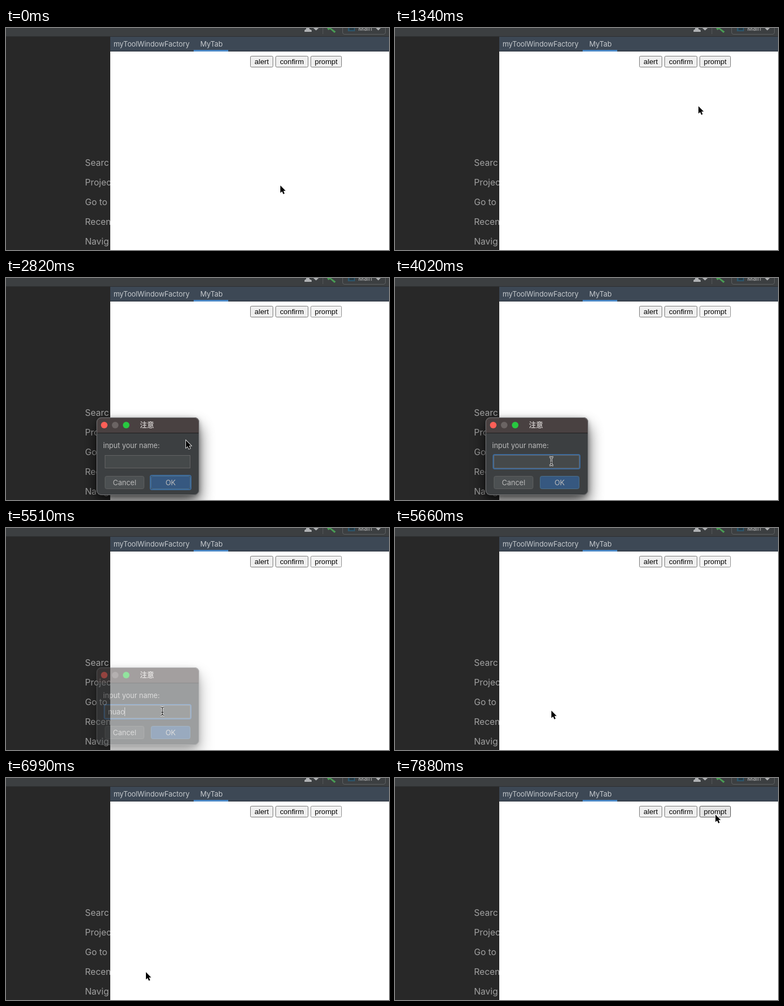
These frames come from a looping animation (698 px wide and 406 px high, 8000 ms). An HTML page:

```html
<!DOCTYPE html>
<html lang="en">
<head>
<meta charset="utf-8">
<title>Prompt dialog demo</title>
<style>
html, body { margin: 0; width: 100%; height: 100%; overflow: hidden; background: #fff; }
svg { display: block; width: 698px; height: 406px; }
text { font: 13px Inter, "Noto Sans CJK SC", "Noto Sans CJK", sans-serif; fill: #bbb; white-space: pre; }
.menu text { font-size: 16px; fill: #a0a0a0; }
.tab { letter-spacing: -.1px; fill: #c4c8cc; }
.web text { font: 13.333px "Liberation Sans", Arial, sans-serif; fill: #000; }
.mid { text-anchor: middle; }
.title { font-weight: 700; fill: #c5c0bf; }
</style>
</head>
<body>
<svg viewBox="0 0 698 406">
  <defs>
    <filter id="blur" x="-50%" y="-50%" width="200%" height="200%"><feGaussianBlur stdDeviation="14"/></filter>
    <filter id="soft" x="-20%" y="-20%" width="140%" height="140%"><feGaussianBlur stdDeviation="4"/></filter>
    <clipPath id="left"><rect width="190" height="406"/></clipPath>
  </defs>
  <rect width="698" height="406" fill="#fff"/>
  <rect width="190" height="406" fill="#282828"/>
  <g id="menu" class="menu" clip-path="url(#left)"></g>

  <rect width="698" height="15" fill="#3c3f41"/>
  <rect y="15" width="698" height="1" fill="#2d2f31"/>
  <g fill="#afb1b3">
    <path d="M547 0h6v2l4 2v3h-13v-3l3-2z"/>
    <path d="M560 0h10l-5 4.500z"/>
    <path d="M674 0h9l-4.500 4.500z"/>
  </g>
  <path d="M577.500 0V11" stroke="#555759"/>
  <path d="M585 0h7l9 6.500-2.500 2.500-8-7-3 2z" fill="#499c54"/>
  <path d="M613.500 0V8q0 3.500 3.500 3.500H688q3.500 0 3.500-3.500V0" fill="none" stroke="#5e6163"/>
  <path d="M623 0h13v6h-13z" fill="#2c566c"/>
  <path d="M626 0h8v4h-8z" fill="#263a44"/>
  <text x="642" y="5" style="font-size:11px">Main</text>

  <rect x="190" y="16" width="508" height="27" fill="#3d4855"/>
  <rect x="190" y="42" width="508" height="1" fill="#2c333c"/>
  <rect x="342" y="40" width="63" height="3" fill="#4a88c7"/>
  <text class="tab" x="196" y="34">myToolWindowFactory</text>
  <text class="tab" x="354" y="34">MyTab</text>

  <g id="web" class="web"></g>
  <g id="ask"></g>
  <g id="reply"></g>
  <path id="arrow" d="M0 0V13.500L3.100 10.700 5.300 15.700 7.700 14.700 5.500 9.800H9.600Z"
    stroke="#fff" stroke-width="1.600" paint-order="stroke"/>
  <g id="beam" fill="none">
    <path id="bar" d="M-3.500-7.500Q0-7.500 0-5V5Q0 7.500-3.500 7.500M3.500-7.500Q0-7.500 0-5V5Q0 7.500 3.500 7.500M-2 2H2" stroke="#fff" stroke-width="3"/>
    <use href="#bar" style="display:none"/>
    <path d="M-3.500-7.500Q0-7.500 0-5V5Q0 7.500-3.500 7.500M3.500-7.500Q0-7.500 0-5V5Q0 7.500 3.500 7.500M-2 2H2" stroke="#000" stroke-width="1.100"/>
  </g>
</svg>
<script>
const LOOP = 8000;
const NAME = 'nuao';
const $ = id => document.getElementById(id);
const show = (id, on) => $(id).setAttribute('visibility', on ? 'visible' : 'hidden');
const place = (id, [x, y]) => $(id).setAttribute('transform', `translate(${x} ${y})`);

// Rectangle whose 1px border lies inside the given box
const box = (x, y, w, h, r, fill, stroke, id = '') =>
  `<rect id="${id}" x="${x + .5}" y="${y + .5}" width="${w - 1}" height="${h - 1}" rx="${r}" fill="${fill}" stroke="${stroke}"/>`;

const ring = (x, y, w, h, id) =>
  `<rect id="${id}" x="${x + 1}" y="${y + 1}" width="${w - 2}" height="${h - 2}" rx="3" fill="none" stroke="#3d6a9a" stroke-width="2"/>`;

const label = (x, y, text, cls = '') => `<text class="${cls}" x="${x}" y="${y}">${text}</text>`;

function dialog(x, y, w, h, titleX, content) {
  const lights = ['#ff5f57', '#6b6463', '#28c840'].map((c, i) =>
    `<circle cx="${x + 14 + i * 20}" cy="${y + 14}" r="6" fill="${c}"/>`).join('');
  const shape = `width="${w}" height="${h}" rx="9"`;
  return `
    <rect x="${x}" y="${y + 15}" ${shape} opacity=".68" filter="url(#blur)"/>
    <rect x="${x}" y="${y + 2}" ${shape} opacity=".3" filter="url(#soft)"/>
    <rect x="${x}" y="${y}" ${shape} fill="#3c3f41"/>
    <path d="M${x} ${y + 28}v-19q0-9 9-9h${w - 18}q9 0 9 9v19z" fill="#494141"/>
    <rect x="${x}" y="${y + 28}" width="${w}" height="1" fill="#1e1e1e"/>
    ${box(x, y, w, h, 8.5, 'none', '#77787a')}
    ${lights}${label(titleX, y + 18, '注意', 'mid title')}${content}`;
}

$('menu').innerHTML = ['Searc', 'Project', 'Go to', 'Recent', 'Navig']
  .map((s, i) => label(144, 252 + i * 36, s)).join('');

$('web').innerHTML = [['alert', 445, 42], ['confirm', 491, 60], ['prompt', 555, 57]]
  .map(([s, x, w]) => box(x, 51, w, 21, 2, '#efefef', '#767676', s) + label(x + w / 2, 66, s, 'mid')).join('');

$('ask').innerHTML = dialog(165, 255, 187, 142, 257, `<g id="form">
  ${label(177, 311, 'input your name:')}
  ${box(180, 324, 156, 24, 0, '#45494a', '#646464', 'field')}
  ${ring(178, 322, 160, 28, 'fieldRing')}
  <text id="typed" x="186" y="341"></text>
  <rect id="caret" y="328" width="1" height="16" fill="#bbb"/>
  ${box(180, 362, 72, 24, 3, '#4c5052', '#5e6060')}${label(216, 379, 'Cancel', 'mid')}
  ${box(264, 362, 72, 24, 3, '#365880', '#4c708c')}${label(300, 379, 'OK', 'mid')}
  ${ring(262, 360, 76, 28, 'okRing')}</g>`);

$('reply').innerHTML = '<rect x="190" y="250" width="172" height="156" fill="#fbfbfb"/>' +
  dialog(189, 277, 139, 98, 271, `
  ${label(201, 326, 'your answer: ' + NAME)}
  ${box(240, 340, 72, 24, 3, '#4c5052', '#466d94')}${ring(238, 338, 76, 28, 'replyRing')}
  ${label(276, 357, '确定', 'mid')}`);

// Number of ticks passed: the first falls on start, the last on end
const ticks = (t, start, end, n) =>
  t < start ? 0 : Math.min(n, 1 + Math.floor((t - start) / (end - start) * (n - 1) + 1e-6));
const ease = p => p * p * (3 - 2 * p);

const moves = [
  [900, 1490, 5, [500, 288], [582, 65]],
  [1930, 2820, 7, [582, 65], [328, 297]],
  [2970, 3270, 3, [328, 297], [285, 335]],
  [5660, 5670, 1, [285, 335], [285, 334]],
  [6110, 6550, 4, [285, 334], [255, 355], [-5, 13]],
  [7140, 7880, 6, [255, 355], [584, 67]]
];

function pointer(t) {
  const [start, end, n, a, b, bow = [0, 0]] = moves.filter(m => t >= m[0]).pop() || moves[0];
  const p = ease(ticks(t, start, end, n) / n);
  const arc = Math.sin(Math.PI * p) * p;
  return a.map((v, i) => Math.round(v + (b[i] - v) * p + bow[i] * arc));
}

function paintButton(t) {
  const hover = t >= 1490 && t < 1780 || t >= 7730;
  const held = t >= 1780 && t < 7730;
  $('prompt').setAttribute('fill', hover ? '#e5e5e5' : held ? '#f5f5f5' : '#efefef');
  $('prompt').setAttribute('stroke', hover ? '#4f4f4f' : held ? '#8d8d8d' : '#767676');
}

function draw(t) {
  const asking = t >= 1780 && t < 5660;
  const focused = t >= 3570;
  $('ask').style.display = asking ? '' : 'none';
  $('ask').setAttribute('opacity', t >= 5510 ? .5 : 1);
  $('form').style.display = t >= 1930 ? '' : 'none';
  $('reply').style.display = t >= 5810 && t < 6990 ? '' : 'none';

  show('fieldRing', focused);
  show('okRing', !focused);
  $('typed').textContent = NAME.slice(0, [0, 1, 3, 4][ticks(t, 4620, 4920, 3)]);
  show('caret', focused && (t < 4020 || t >= 4620));
  if (asking) $('caret').setAttribute('x', 186 + Math.round($('typed').getComputedTextLength()));

  paintButton(t);
  const at = pointer(t);
  const beam = t >= 3120 && t < 5660;
  show('beam', beam);
  show('arrow', !beam);
  place('beam', at);
  place('arrow', at);
}

const began = performance.now();
function loop() {
  draw((performance.now() - began) % LOOP);
  requestAnimationFrame(loop);
}
loop();
</script>
</body>
</html>
```
